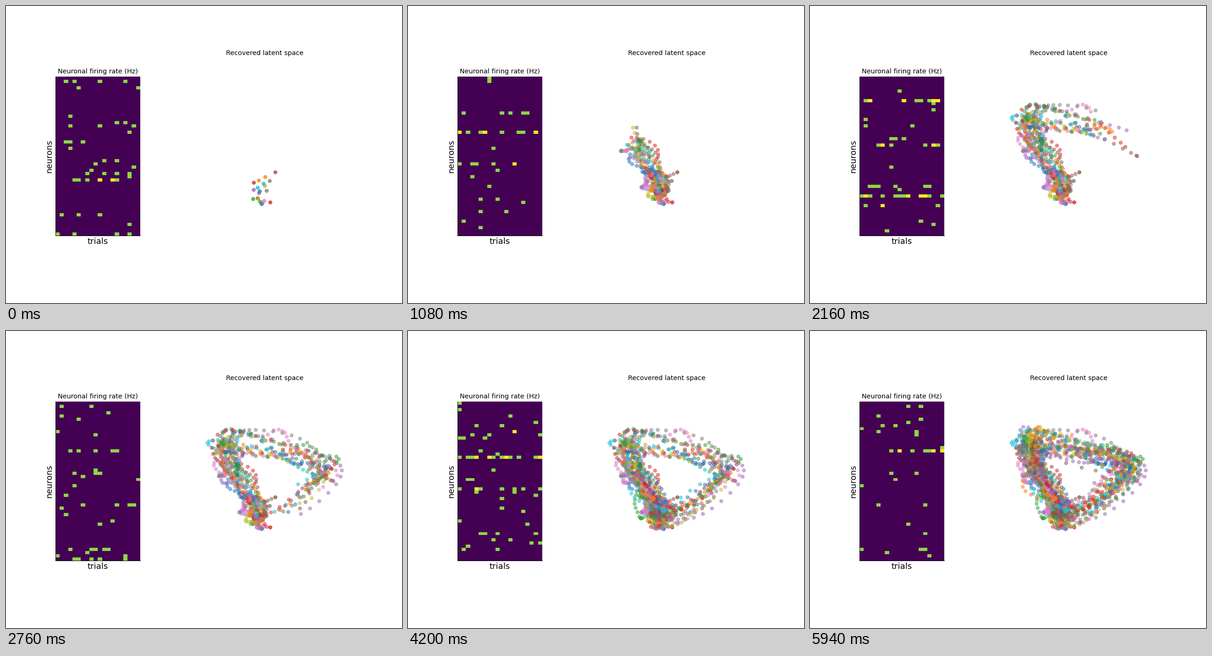
These frames come from a looping animation (864x648 px, 6000 ms). A matplotlib script:

```python
import numpy as np
import matplotlib.pyplot as plt
from matplotlib.animation import FuncAnimation
from matplotlib.colors import to_rgba

W, H, DPI = 864, 648, 72
FRAMES, INTERVAL = 100, 60
NEURONS, TRIALS = 50, 20
LAP = 52  # frames per round of the latent ring

plt.rcParams["font.family"] = "DejaVu Sans"
rng = np.random.default_rng(12)

# Key points of the mean path: phase, x, y
PATH = np.array([
    (0, 556, 402), (8, 537, 388), (18, 496, 310), (26, 473, 242),
    (30, 505, 238), (34, 600, 260), (40, 706, 293), (43, 698, 316),
    (49, 600, 385),
])

# Strongly tuned neurons: row -> preferred phase
HOT = {32: 0, 17: 18, 7: 34, 37: 37, 15: 46}


def bell(d, width):
    return np.exp(-0.5 * (d / width) ** 2)


def drift(width):
    """Smooth unit-variance noise for every trial."""
    t = np.arange(FRAMES)
    kernel = bell(t[:, None] - t, width)
    kernel /= np.sqrt((kernel ** 2).sum(axis=1, keepdims=True))
    return np.clip(kernel @ rng.normal(size=(FRAMES, TRIALS)), -2.5, 2.5)


def path(phase):
    """Ring position with slightly rounded corners."""
    def at(p):
        return np.stack([np.interp(p, PATH[:, 0], PATH[:, k], period=LAP)
                         for k in (1, 2)], axis=-1)
    return (at(phase - 1) + at(phase) + at(phase + 1)) / 3


def make_tracks():
    """Each trial leaves its random start and then follows the ring."""
    t = np.arange(FRAMES)[:, None]
    held = np.exp(-(t / 3.5) ** 2)
    phase = t + 2.2 * drift(7) * (1 - held)
    wander = np.stack([15 * drift(2.4), 16 * drift(2.4)], axis=-1)
    start = rng.normal(size=(TRIALS, 2)).clip(-2, 2) * (14, 24)
    held = held[..., None]
    return path(phase) + wander * (1 - held) + start * held


def make_spikes():
    """Poisson counts from neurons tuned to a phase of the ring."""
    peaks = rng.uniform(0, LAP, NEURONS)
    gains = rng.exponential(0.12, NEURONS)
    peaks[list(HOT)] = list(HOT.values())
    gains[list(HOT)] = 0.6
    d = (np.arange(FRAMES)[:, None] - peaks + LAP / 2) % LAP - LAP / 2
    rates = 0.015 + gains * bell(d, 4)
    return rng.poisson(rates[..., None], (FRAMES, NEURONS, TRIALS))


tracks = make_tracks()
heat = np.minimum(0.83 * make_spikes(), 1)

# The starting dots are laid down twice
dots = np.concatenate([tracks[:1], tracks]).reshape(-1, 2)
colors = np.tile([to_rgba(f"C{k % 10}", 0.5) for k in range(TRIALS)],
                 (FRAMES + 1, 1))

fig = plt.figure(figsize=(W / DPI, H / DPI), dpi=DPI, facecolor="white")

stage = fig.add_axes([0, 0, 1, 1])
stage.set(xlim=(0, W), ylim=(H, 0))
stage.axis("off")
stage.text(564.6, 107.1, "Recovered latent space", fontsize=14.4, ha="center")
cloud = stage.scatter([], [], s=7.2 ** 2, linewidths=1.2)

left, top, width, height = 108, 154, 184.7, 346.6
raster = fig.add_axes([left / W, 1 - (top + height) / H, width / W, height / H])
image = raster.imshow(heat[0], cmap="viridis", vmin=0, vmax=1,
                      aspect="auto", interpolation="nearest")
raster.set(xticks=[], yticks=[])
raster.set_title("Neuronal firing rate (Hz)", fontsize=14.4, pad=7.2)
raster.set_xlabel("trials", fontsize=18, labelpad=4.8)
raster.set_ylabel("neurons", fontsize=18, labelpad=4.8)
raster.spines[["top", "right"]].set_visible(False)
raster.spines[["left", "bottom"]].set_linewidth(0.96)


def update(i):
    image.set_data(heat[i])
    n = (i + 2) * TRIALS
    cloud.set_offsets(dots[:n])
    cloud.set_facecolor(colors[:n])
    cloud.set_edgecolor(colors[:n])
    return image, cloud


anim = FuncAnimation(fig, update, frames=FRAMES, interval=INTERVAL,
                     repeat=True, repeat_delay=0)
plt.show()
```
